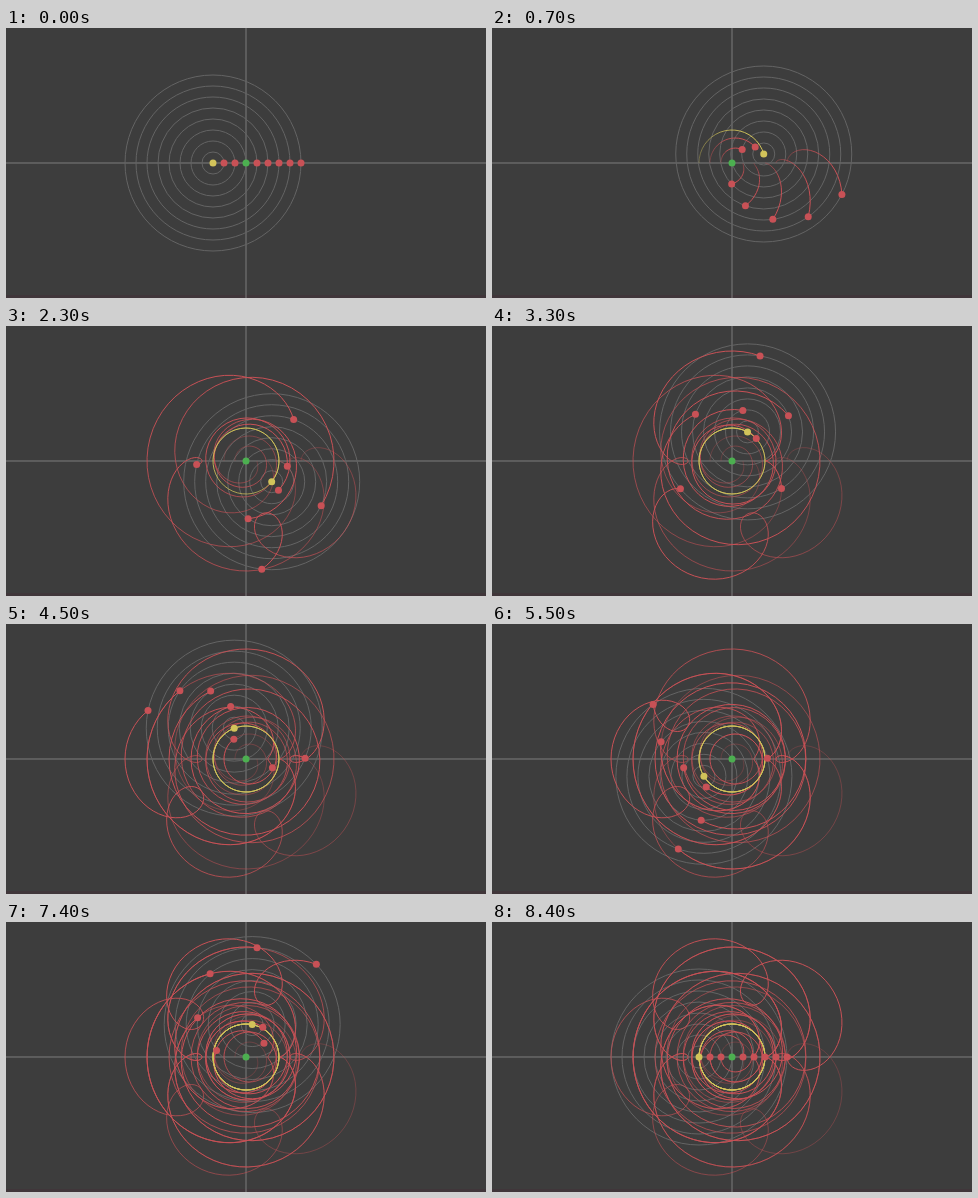
Write an HTML page with a canvas that moves like this. It is 480 px wide and 270 px high and loops after 8500 ms.

```html
<!DOCTYPE html>
<html lang="en">
<head>
<meta charset="utf-8">
<title>Geocentric orbits</title>
<style>
  html, body { margin: 0; height: 100%; overflow: hidden; background: #3d3d3d; }
  canvas { display: block; }
</style>
</head>
<body>
<canvas id="stage" width="480" height="270"></canvas>
<script>
const ctx = document.getElementById('stage').getContext('2d');
const RED = '#c85156', YELLOW = '#d2c35a', GREEN = '#4caf50';
const CENTER = { x: 240, y: 135 };
const GAP = 11, HOME = 3;            // orbit spacing, and the orbit the view is fixed to
const PLANETS = [1, 2, 4, 5, 6, 7, 8];
const LOOP = 8500, FRAME = 100, STEPS = 250;

// Orbit k makes 9 - k turns per loop around the sun; everything is seen from HOME.
function position(k, step) {
  const phase = step / STEPS * 2 * Math.PI;
  const own = (9 - k) * phase, home = (9 - HOME) * phase;
  return {
    x: CENTER.x + GAP * (k * Math.cos(own) - HOME * Math.cos(home)),
    y: CENTER.y + GAP * (k * Math.sin(own) - HOME * Math.sin(home))
  };
}

function line(x1, y1, x2, y2) {
  ctx.beginPath();
  ctx.moveTo(x1, y1);
  ctx.lineTo(x2, y2);
  ctx.stroke();
}

function dot(p, color) {
  ctx.fillStyle = color;
  ctx.beginPath();
  ctx.arc(p.x, p.y, 3.5, 0, 2 * Math.PI);
  ctx.fill();
}

// The trail fades towards its oldest end.
function trail(k, steps, color) {
  ctx.strokeStyle = color;
  let from = position(k, 0);
  for (let i = 1; i <= steps; i++) {
    const to = position(k, i);
    ctx.globalAlpha = 0.25 + 0.75 * Math.min(1, 1.3 * i / steps);
    line(from.x, from.y, to.x, to.y);
    from = to;
  }
  ctx.globalAlpha = 1;
}

function draw(time) {
  const frame = Math.floor(time % LOOP / FRAME);
  const step = Math.max(0, 3 * frame - 2);
  const sun = position(0, step);

  ctx.fillStyle = '#3d3d3d';
  ctx.fillRect(0, 0, 480, 270);
  ctx.fillStyle = '#40363a';
  ctx.fillRect(0, 267, 480, 3);

  ctx.lineWidth = 1;
  ctx.strokeStyle = '#7c7c7c';
  line(0, 135, 480, 135);
  line(240, 0, 240, 270);

  ctx.strokeStyle = '#646464';
  for (let k = 1; k <= 8; k++) {
    ctx.beginPath();
    ctx.arc(sun.x, sun.y, GAP * k, 0, 2 * Math.PI);
    ctx.stroke();
  }

  for (const k of PLANETS) trail(k, step, RED);
  trail(0, step, YELLOW);

  for (const k of PLANETS) dot(position(k, step), RED);
  dot(sun, YELLOW);
  dot(CENTER, GREEN);
}

function tick(now) {
  draw(now);
  requestAnimationFrame(tick);
}
requestAnimationFrame(tick);
</script>
</body>
</html>
```
